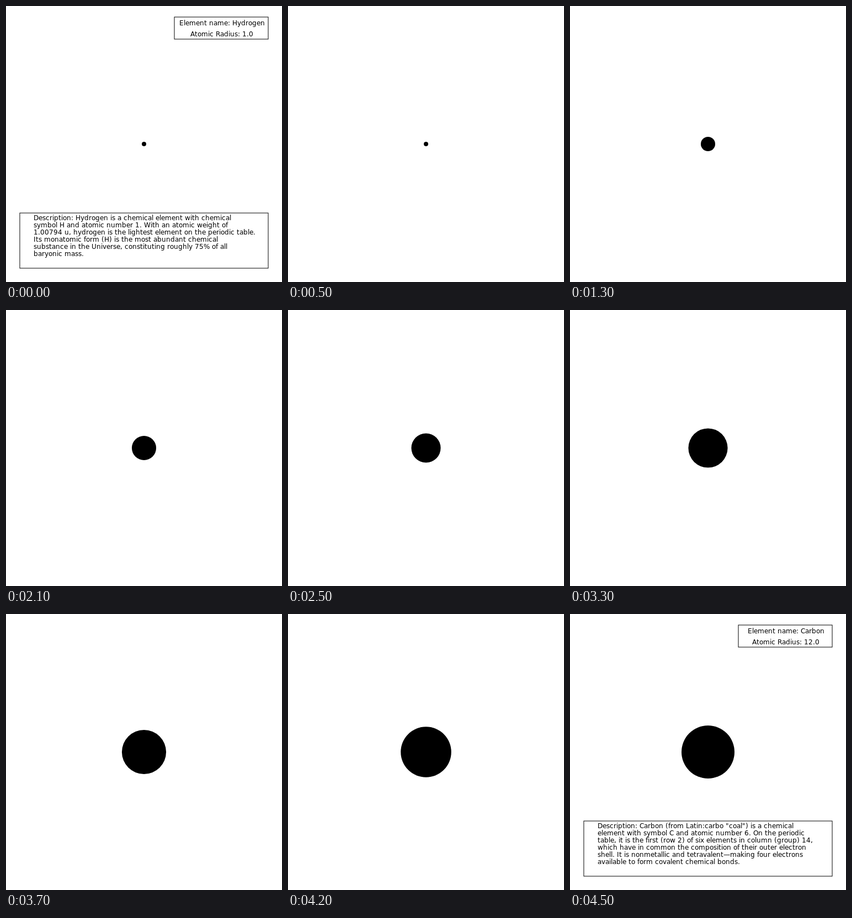
An HTML page with a canvas that plays this animation: 500 px wide and 500 px high, repeating every 8 s.

```html
<!DOCTYPE html>
<html lang="en">
<head>
<meta charset="utf-8">
<style>
  html, body { margin: 0; width: 100%; height: 100%; overflow: hidden; background: #fff; }
  canvas { display: block; }
</style>
</head>
<body>
<canvas id="stage" width="500" height="500"></canvas>
<script>
const ctx = document.getElementById('stage').getContext('2d');
const LOOP = 8000, STEP = 100;
const GROW_START = 500, GROW_END = 4400, INFO_BACK = 4500;
const SCALE = 4;

const hydrogen = {
  name: 'Hydrogen',
  radius: 1,
  lines: [
    'Description: Hydrogen is a chemical element with chemical',
    'symbol H and atomic number 1. With an atomic weight of',
    '1.00794 u, hydrogen is the lightest element on the periodic table.',
    'Its monatomic form (H) is the most abundant chemical',
    'substance in the Universe, constituting roughly 75% of all',
    'baryonic mass.'
  ]
};
const carbon = {
  name: 'Carbon',
  radius: 12,
  lines: [
    'Description: Carbon (from Latin:carbo "coal") is a chemical',
    'element with symbol C and atomic number 6. On the periodic',
    'table, it is the first (row 2) of six elements in column (group) 14,',
    'which have in common the composition of their outer electron',
    'shell. It is nonmetallic and tetravalent\u2014making four electrons',
    'available to form covalent chemical bonds.'
  ]
};

// Letters advance by whole pixels.
const advance = char => Math.round(ctx.measureText(char).width);

function drawText(text, x, y) {
  for (const char of text) {
    ctx.fillText(char, x, y);
    x += advance(char);
  }
}

function drawCentered(text, x, y) {
  const width = [...text].reduce((sum, char) => sum + advance(char), 0);
  drawText(text, Math.round(x - width / 2), y);
}

function drawAtom(radius) {
  ctx.beginPath();
  ctx.arc(250, 250, radius * SCALE, 0, Math.PI * 2);
  ctx.fill();
}

function drawInfo(element) {
  ctx.strokeRect(305, 20, 170, 40);
  ctx.strokeRect(25, 375, 450, 100);
  drawCentered('Element name: ' + element.name, 391, 35);
  drawCentered('Atomic Radius: ' + element.radius.toFixed(1), 391, 55);
  element.lines.forEach((line, i) => drawText(line, 50, 388 + 13 * i));
}

function draw(time) {
  ctx.fillStyle = '#fff';
  ctx.fillRect(0, 0, 500, 500);
  ctx.fillStyle = ctx.strokeStyle = '#000';
  ctx.lineWidth = 1;
  ctx.font = '12px "DejaVu Sans", sans-serif';

  const stepped = Math.floor(time / STEP) * STEP;
  const progress = Math.min(1, Math.max(0, (stepped - GROW_START) / (GROW_END - GROW_START)));
  drawAtom(hydrogen.radius + (carbon.radius - hydrogen.radius) * progress);
  if (time < GROW_START) drawInfo(hydrogen);
  else if (time >= INFO_BACK) drawInfo(carbon);
}

const start = performance.now();
function tick() {
  draw((performance.now() - start) % LOOP);
  requestAnimationFrame(tick);
}
tick();
</script>
</body>
</html>
```
